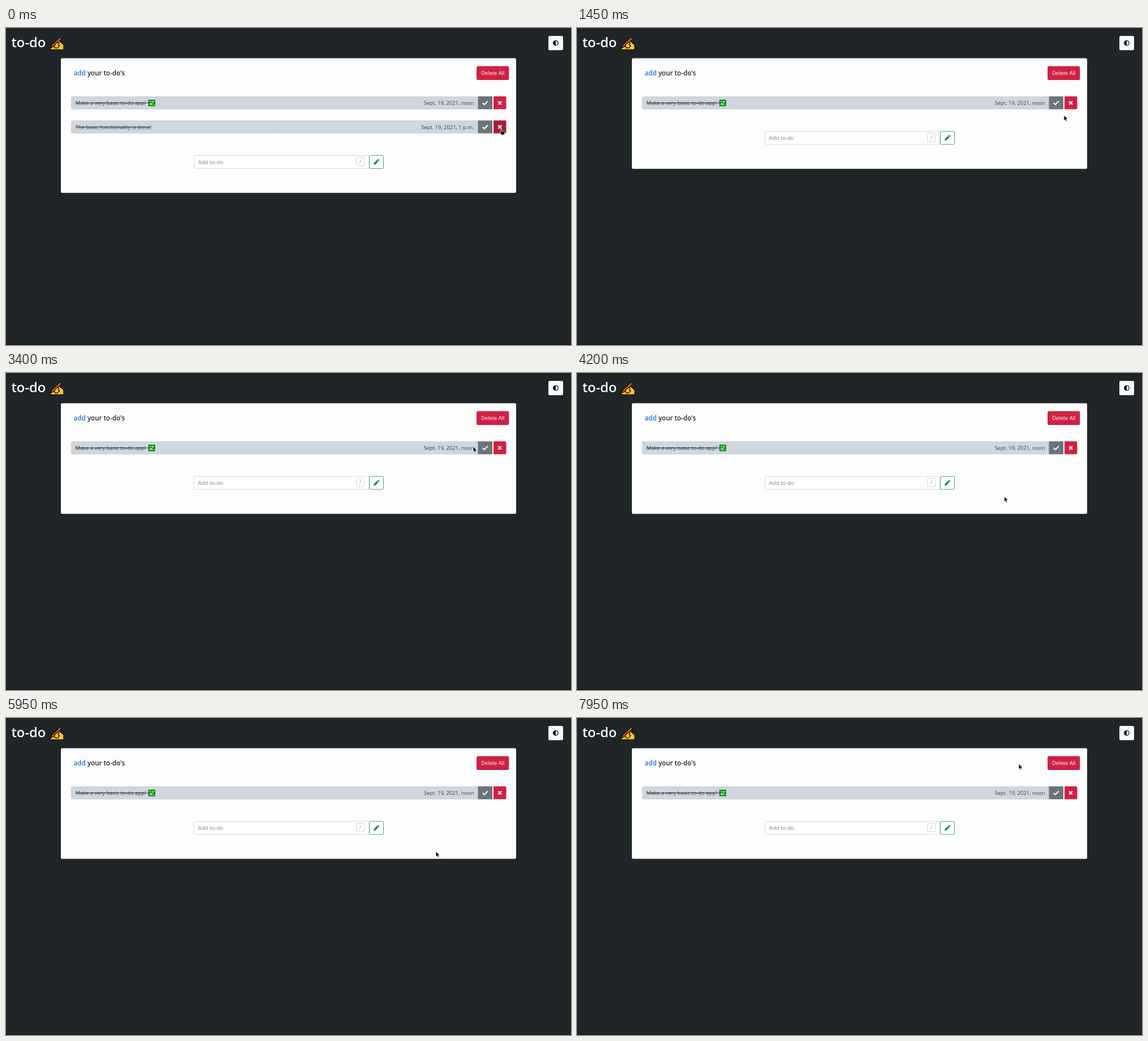
Recreate the animation shown at these times as an HTML page. Size 999 by 561 pixels, loop 8000 ms.

```html
<!DOCTYPE html>
<html lang="en">
<head>
<meta charset="utf-8">
<title>to-do</title>
<style>
  html, body { margin: 0; width: 100%; height: 100%; overflow: hidden; background: #202628; }
  svg { display: block; width: 999px; height: 561px; }
  text { font: 9.4px "Open Sans", "Noto Sans", sans-serif; fill: #24282c; }
  .strong { font-weight: 600; }
  .light { fill: #fff; }
  .done .cell { fill: #cfd6de; stroke: #cbd3db; }
  .cell { fill: #e7eaec; stroke: #ced4da; }
  .done text { fill: #3b4146; }
  .strike { stroke: #30363a; display: none; }
  .done .strike { display: block; }
  .red { fill: #cd2145; }
  .red.hover { fill: #a91d3b; }
  .green { fill: #218f51; }
  .green.hover { fill: #157347; }
  .done .green { fill: #6b747c; }
  .done .green.hover { fill: #5c636a; }
  .blue { fill: #1670f7; }
  .blue.hover { fill: #0b5ed7; }
  .icon { fill: none; stroke: #fff; stroke-width: 2; }
</style>
</head>
<body>
<svg viewBox="0 0 999 561">
  <defs>
    <g id="tick-button-icon"><path class="icon" d="M842.8 132.6l3 3 6-6.2"/></g>
    <g id="cross-icon"><path class="icon" d="M870.2 129.6l5.8 5.8m0-5.8l-5.8 5.8"/></g>
  </defs>
  <rect width="999" height="561" fill="#202628"/>
  <rect y="560" width="999" height="1" fill="#0c0f10"/>

  <text class="strong" x="9.5" y="34" style="font-size:23.8px;fill:#f8f9fa">to-do</text>
  <g stroke="#111" stroke-width="1.3" stroke-linejoin="round">
    <path fill="#ffc52e" d="M77.5 38.5L80 34l5.5-6.5 4.5-4.5 5 .3 3 3.2 4 3.5v8.5z"/>
    <path fill="#e0502e" d="M79 35.2l2-5.2L95.500 16.300l3 2.900L84 33z"/>
    <path fill="#ffc52e" d="M85.500 30.500l5-5 3.500 1.200-2 3.300 3 1.200-4 4.300-4.500-.5z"/>
  </g>

  <rect x="959" y="14" width="26" height="25.300" rx="2.500" fill="#f8f9fa"/>
  <circle cx="972" cy="26.600" r="4.300" fill="none" stroke="#16191c" stroke-width="1.300"/>
  <path d="M972 22a4.600 4.600 0 0 0 0 9.200z" fill="#16191c"/>

  <rect id="card" x="97" y="53.500" width="805" height="195.700" rx="2.500" fill="#fdfdfd"/>
  <text class="strong" x="119.700" y="84" style="font-size:11.600px"><tspan fill="#2f6fe4">add</tspan> your to-do's</text>

  <g id="completeAll">
    <rect class="blue" x="750.700" y="67.500" width="71.500" height="24.500" rx="2.500"/>
    <text class="light" x="786.500" y="82.800" text-anchor="middle">Complete All</text>
  </g>
  <g id="deleteAll">
    <rect class="red" x="832" y="67.500" width="57.300" height="24.500" rx="2.500"/>
    <text class="light" x="860.700" y="82.800" text-anchor="middle">Delete All</text>
  </g>

  <g id="rows"></g>

  <g id="form">
    <rect x="332.500" y="183" width="309.500" height="23" rx="2" fill="#fff" stroke="#d3d8dd"/>
    <text x="339.600" y="198" style="fill:#7b8289;font-size:9.600px">Add to-do</text>
    <rect x="619.500" y="186.300" width="14" height="15" rx="2" fill="#fff" stroke="#d0d4d8"/>
    <text x="626.500" y="197.400" text-anchor="middle" style="fill:#858b90;font-size:9px">/</text>
    <rect x="642.500" y="183" width="25" height="23" rx="2" fill="#fff" stroke="#41a473"/>
    <path fill="#198754" d="M650 199.400l.6-3.100 5.300-5.300 2.500 2.500-5.300 5.300zM656.500 190.400l.9-.9q.6-.5 1.200 0l1.300 1.300q.5.600 0 1.200l-.9.900z"/>
  </g>

  <g id="arrow">
    <path d="M0 0v10l2.300-2.100 1.600 3.300 1.700-.8-1.600-3.200 3.100-.2z" fill="#111" stroke="#fff" stroke-width=".8"/>
  </g>
  <g id="hand">
    <path d="M-.9.500Q0-.5.900.500v3.200l4 .9q1.200.5 1 1.900l-.8 4.200h-5L-2.800 7q-.4-1.300.7-1.500l1.200.8z" fill="#111" stroke="#fff" stroke-width=".7"/>
  </g>
</svg>

<script>
const LOOP = 8000, ROW_STEP = 42.6;
const DELETED = 250, REOPENED = 6400, COMPLETED = 7500;
const el = id => document.getElementById(id);

const rowMarkup = (label, date, strikeEnd, extra = "") => `
  <path class="cell" d="M475 121.500H117.500q-2 0-2 2v18q0 2 2 2H475zH834.500v22H475"/>
  <text x="122.800" y="136">${label}</text>${extra}
  <path class="strike" d="M123 132.700H${strikeEnd}"/>
  <text x="827.500" y="136" text-anchor="end">${date}</text>
  <g class="check"><rect class="green" x="834.500" y="121" width="25.500" height="22.800"/><use href="#tick-button-icon"/></g>
  <g class="delete"><path class="red" d="M862 121h20.500q2 0 2 2v18.800q0 2-2 2H862z"/><use href="#cross-icon"/></g>`;

const checkEmoji = `<rect x="252.300" y="127.500" width="10.700" height="10.300" fill="#18d21b" stroke="#123d13"/>
  <path d="M254.700 132.700l2 2.300 4-4.800" fill="none" stroke="#fff" stroke-width="1.300"/>`;

el("rows").innerHTML = `
  <g id="first">${rowMarkup("Make a very basic to-do app!", "Sept. 19, 2021, noon", 264, checkEmoji)}</g>
  <g id="second" class="done" transform="translate(0 ${ROW_STEP})">
    ${rowMarkup("The basic functionality is done!", "Sept. 19, 2021, 1 p.m.", 256)}</g>`;

// Pointer keys: time, x, y
const path = [
  [0, 876, 178.5], [150, 872, 184], [1100, 872, 184], [2000, 839, 96], [2600, 839, 96],
  [3300, 826, 130], [3700, 826, 130], [4600, 705, 281], [5000, 724, 253], [5150, 734, 243],
  [5950, 760, 236], [6300, 847, 133], [6450, 847, 133], [6750, 766, 95],
  [7250, 781, 81], [8000, 781, 81]
];

function pointerAt(t) {
  const i = path.findIndex(key => key[0] > t);
  const [t0, x0, y0] = path[i - 1], [t1, x1, y1] = path[i];
  const p = (t - t0) / (t1 - t0), e = p * p * (3 - 2 * p);
  return [x0 + (x1 - x0) * e, y0 + (y1 - y0) * e];
}

const show = (node, on) => node.style.display = on ? "" : "none";

const buttons = [
  { node: el("completeAll"), box: [751, 67, 822, 92] },
  { node: el("deleteAll"), box: [832, 67, 889, 92] },
  ...["first", "second"].flatMap((id, i) => {
    const top = 121 + i * ROW_STEP, bottom = top + 23;
    return [
      { node: el(id).querySelector(".check"), box: [834, top, 860, bottom] },
      { node: el(id).querySelector(".delete"), box: [862, top, 885, bottom] }
    ];
  })
];

function draw(t) {
  const two = t < DELETED, open = t >= REOPENED && t < COMPLETED;
  show(el("second"), two);
  show(el("completeAll"), open);
  el("first").setAttribute("class", open ? "" : "done");
  el("card").setAttribute("height", 195.7 + (two ? ROW_STEP : 0));
  el("form").setAttribute("transform", `translate(0 ${two ? ROW_STEP : 0})`);

  const [x, y] = pointerAt(t);
  let hovering = false;
  for (const { node, box: [left, top, right, bottom] } of buttons) {
    const visible = node === el("completeAll") ? open : two || !el("second").contains(node);
    const over = visible && x >= left && x <= right && y >= top && y <= bottom;
    node.firstElementChild.classList.toggle("hover", over);
    hovering ||= over;
  }
  show(el("hand"), hovering);
  show(el("arrow"), !hovering);
  el(hovering ? "hand" : "arrow").setAttribute("transform", `translate(${x} ${y})`);
}

const start = performance.now();
function tick() {
  draw((performance.now() - start) % LOOP);
  requestAnimationFrame(tick);
}
tick();
</script>
</body>
</html>
```
